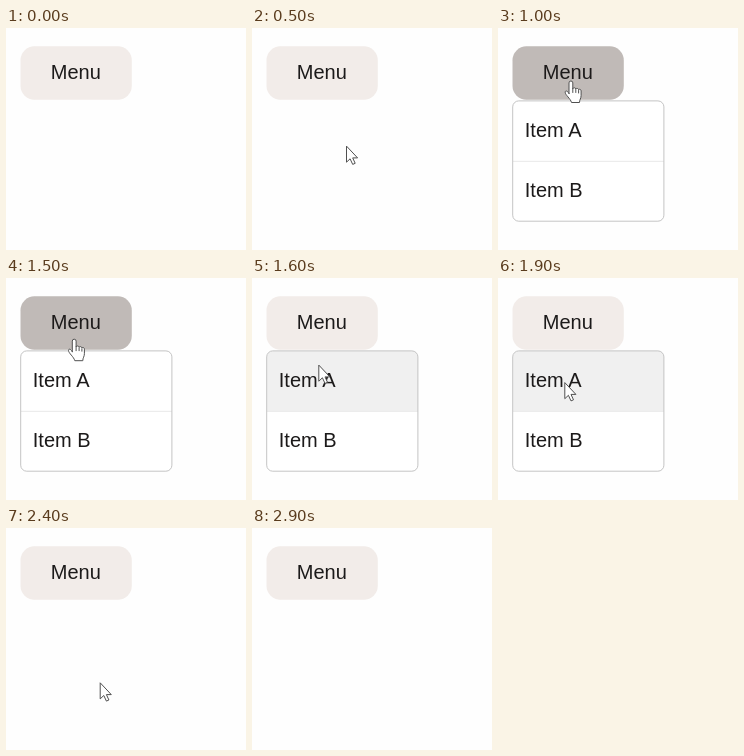
These frames come from a looping animation (240 px wide and 222 px high, 3.4 s). An HTML page:

```html
<!DOCTYPE html>
<html>
<head>
<meta charset="utf-8">
<style>
html, body { margin: 0; width: 100%; height: 100%; overflow: hidden; background: #fefefe; }
svg { display: block; width: 240px; height: 222px; }
text { font: 20px "Liberation Sans", Arial, sans-serif; fill: #1c1a1a; }
#hand, #arrow { fill: #fff; stroke: #505050; stroke-linejoin: round; stroke-linecap: round; }
</style>
</head>
<body>
<svg viewBox="0 0 240 222">
  <defs>
    <clipPath id="round"><rect x="15" y="73" width="151" height="120" rx="6"/></clipPath>
  </defs>
  <rect id="button" x="14.5" y="18.3" width="111.3" height="53.5" rx="14"/>
  <rect id="ripple" x="21" y="18.3" width="98" height="53.5" fill="#cac3c0"/>
  <text x="44.8" y="51">Menu</text>
  <g id="panel">
    <rect x="14.7" y="72.9" width="151.2" height="120.3" rx="6" fill="#fff"/>
    <rect id="hover" x="14" width="153" height="60" fill="#f0f0f0" clip-path="url(#round)"/>
    <path d="M15 133.3H166" stroke="#e8e8e8"/>
    <rect x="14.7" y="72.9" width="151.2" height="120.3" rx="6" fill="none" stroke="#c4c4c4"/>
    <text x="26.8" y="109">Item A</text>
    <text x="26.8" y="169">Item B</text>
  </g>
  <g id="hand">
    <path d="M4.5 13V2.4a1.9 1.9 0 0 1 3.8 0V8.2a1.6 1.6 0 0 1 3 .3 1.6 1.6 0 0 1 2.8 .7 1.5 1.5 0 0 1 2.5 1.2V15c0 3-1.6 4-1.6 7H7C6 18 .7 14.5 .7 11.7c0-1.9 2.3-1.7 3.8 1.3z"/>
    <path d="M8.3 8V12M11.3 9V12M14.1 10V12.5" fill="none"/>
  </g>
  <path id="arrow" d="M.5 .5V16.2L4.1 12.8 6.7 18.4 9.2 17.3 6.7 11.9H11.2z"/>
</svg>
<script>
const LOOP = 3400;
const idle = "#f2ece9", warm = "#eae4e2", dark = "#c0bab7";
// [time, cursor, x, y, button colour, menu open, hovered item]
const steps = [
  [0, "", 0, 0, idle],
  [400, "arrow", 130, 187, idle],
  [500, "arrow", 94, 118, idle],
  [600, "hand", 67.5, 62.5, warm],
  [700, "hand", 66.5, 52.5, dark],
  [1000, "hand", 66.5, 52.5, dark, true],
  [1500, "hand", 61.8, 60.7, dark, true],
  [1600, "arrow", 66.3, 87, idle, true, 1],
  [1700, "arrow", 66.3, 104.5, idle, true, 1],
  [2000, "arrow", 72, 124, idle, true, 1],
  [2100, "arrow", 83, 142, idle, true, 2],
  [2200, "arrow", 93.7, 154.7, idle, true, 2],
  [2400, "arrow", 93.7, 154.7, idle],
  [2700, "arrow", 107, 178, idle],
  [2800, "arrow", 126, 207, idle],
  [2900, "", 0, 0, idle]
];
const $ = id => document.getElementById(id);
const show = (id, on) => $(id).style.display = on ? "" : "none";

function draw(now) {
  const t = now % LOOP;
  const [, cursor, x, y, color, open, item] = steps.findLast(s => s[0] <= t);
  $("button").setAttribute("fill", color);
  show("ripple", color === warm);
  show("panel", open);
  show("hover", item);
  $("hover").setAttribute("y", item === 2 ? 134 : 73);
  for (const id of ["hand", "arrow"]) {
    show(id, id === cursor);
    $(id).setAttribute("transform", `translate(${x} ${y})`);
  }
}

const start = performance.now();
function tick() {
  draw(performance.now() - start);
  requestAnimationFrame(tick);
}
tick();
</script>
</body>
</html>
```
